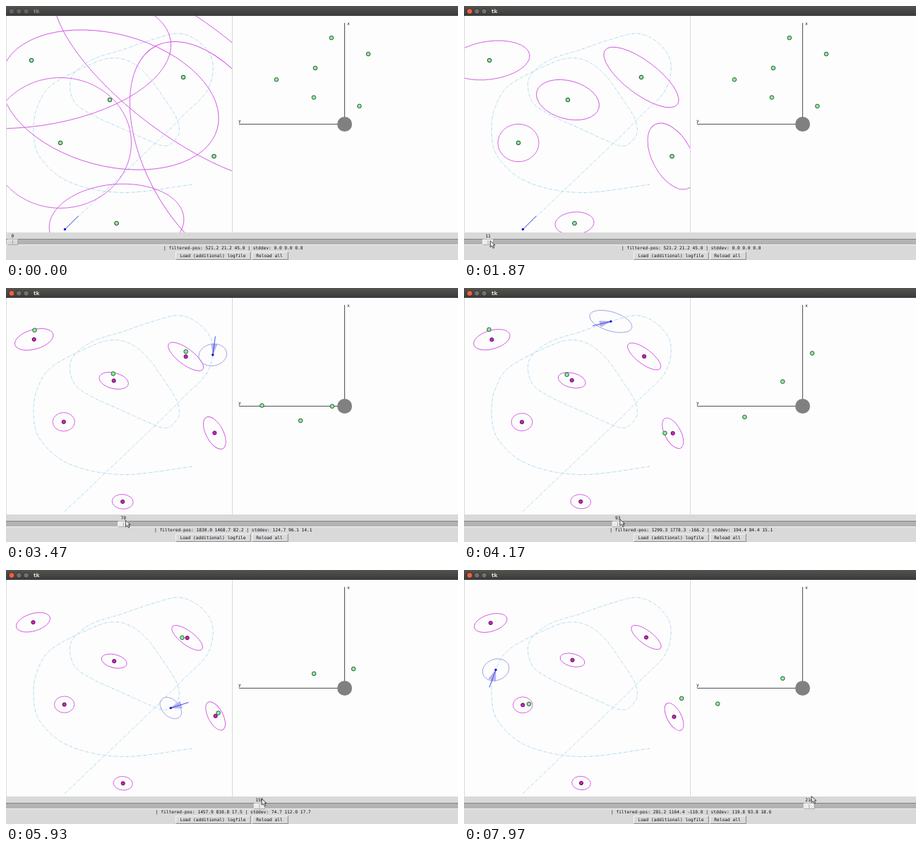
These frames come from a looping animation (640x360 px, 8 s). An HTML page:

```html
<!DOCTYPE html>
<html lang="en">
<head>
<meta charset="utf-8">
<title>tk</title>
<style>
html, body { margin: 0; width: 100%; height: 100%; overflow: hidden; background: #d9d9d9; }
svg { display: block; width: 100%; height: 100%; }
text { font: 6.2px "DejaVu Sans Mono", monospace; fill: #0c0c18; white-space: pre; }
.mid { text-anchor: middle; }
.title { font: bold 7.5px "DejaVu Sans", sans-serif; }
.ell { fill: none; stroke: #d255e4; stroke-width: .9; }
.mark { fill: #d820c8; stroke: #400a40; stroke-width: .9; }
.obs { fill: #90ee9c; stroke: #1c4a2c; stroke-width: .9; }
</style>
</head>
<body>
<svg viewBox="0 0 640 360">
  <defs>
    <linearGradient id="bar" x2="0" y2="1">
      <stop offset="0" stop-color="#55534f"/><stop offset="1" stop-color="#3a393b"/>
    </linearGradient>
    <clipPath id="map"><rect x="1" y="14" width="319" height="307"/></clipPath>
    <clipPath id="local"><rect x="321" y="14" width="319" height="307"/></clipPath>
  </defs>
  <rect width="640" height="360" fill="#d9d9d9"/>
  <rect width="640" height="14" fill="url(#bar)"/>
  <g id="buttons" stroke="#2a292c" stroke-width=".8">
    <circle id="close" cx="8" cy="7.5" r="4"/>
    <circle cx="18.3" cy="7.5" r="3.8" fill="#73716e"/>
    <circle cx="28.6" cy="7.5" r="3.8" fill="#73716e"/>
  </g>
  <text id="name" class="title" x="39" y="10.3">tk</text>
  <rect x="1" y="14" width="319" height="307" fill="#fdfdfd"/>
  <rect x="321" y="14" width="319" height="307" fill="#fdfdfd"/>
  <g id="left" clip-path="url(#map)"></g>
  <g clip-path="url(#local)">
    <path d="M479.5 24V167.5M330 167.5H479.5" stroke="#505058" fill="none"/>
    <text x="483" y="27">x</text><text x="329" y="165">y</text>
    <circle cx="479.5" cy="167.5" r="10.5" fill="#808080"/>
    <g id="right"></g>
  </g>
  <rect y="330.5" width="640" height="8" fill="#b3b3b3"/>
  <path d="M0 330.5H640" stroke="#828282"/>
  <path d="M0 338.5H640" stroke="#f2f2f2"/>
  <g id="thumb">
    <rect id="knob" x="-7.5" y="331" width="15" height="7.5"/>
    <path d="M-7.5 338V331H7.5" fill="none" stroke="#fff" stroke-width=".8"/>
    <path d="M-7.5 338.3H7.5V331M0 332V337.5" fill="none" stroke="#8c8c8c" stroke-width=".7"/>
  </g>
  <text id="label" class="mid" y="328.3"></text>
  <text id="status" class="mid" x="321.7" y="345.2"></text>
  <g fill="none" stroke-width=".9">
    <path d="M240.5 359V348.7H346M348.5 359V348.7H399" stroke="#fafafa"/>
    <path d="M240.5 359.4H346.3V348.7M348.5 359.4H399.3V348.7" stroke="#828282"/>
  </g>
  <text class="mid" x="293" y="355.8">Load (additional) logfile</text>
  <text class="mid" x="373" y="355.8">Reload all</text>
  <path id="cursor" d="M0 0V9L2.2 7L4 10.5L5.6 9.7L4 6.3H6.8Z" fill="#ececec" stroke="#1c1c20" stroke-width=".8"/>
</svg>
<script>
const $ = id => document.getElementById(id);
const SVG = 'http://www.w3.org/2000/svg';
const LOOP = 8000, SUB = 16, RAD = Math.PI / 180;

const set = (el, attrs) => { for (const k in attrs) el.setAttribute(k, attrs[k]); return el; };
const add = (parent, tag, attrs) => parent.appendChild(set(document.createElementNS(SVG, tag), attrs));
const lerp = (a, b, u) => a + (b - a) * u;
const mix = (a, b, u) => a.map((x, i) => lerp(x, b[i], u));

// Piecewise linear rows of [key, ...values]
function track(rows, k) {
  const i = Math.max(1, rows.findIndex(r => r[0] > k)), n = rows.length - 1;
  if (k >= rows[n][0]) return rows[n].slice(1);
  const a = rows[i - 1], b = rows[i];
  return mix(a, b, Math.max(0, (k - a[0]) / (b[0] - a[0]))).slice(1);
}

// World millimetres to map pixels
const SX = .16, SY = .1532, Y0 = 319.8;
const toMap = (x, y) => [x * SX, Y0 - y * SY];

const route = [
  [521.2, 21.2], [1353.7, 850.4], [1562, 1069], [1780, 1305], [1830, 1560], [1725, 1741], [1537, 1833],
  [1299.3, 1778.3], [1031, 1683], [750, 1585], [577, 1420], [600, 1210], [760, 1082], [1031, 952],
  [1281, 834], [1387, 795], [1457.9, 810.8], [1531, 912], [1506, 1056], [1387, 1252], [1250, 1448],
  [1112, 1565], [960.3, 1606.2], [775, 1559], [412, 1363], [281.2, 1164.4], [244, 939], [300, 690],
  [560, 460], [1031, 361], [1644, 436]
];

// Catmull-Rom samples: arc length, x, y, unwrapped heading
function sampleRoute() {
  const end = route.length - 1, at = i => route[Math.max(0, Math.min(end, i))];
  const pts = [];
  for (let k = 0; k <= end * SUB; k++) {
    const i = Math.floor(k / SUB), u = k / SUB - i;
    const [p, q, r, w] = [at(i - 1), at(i), at(i + 1), at(i + 2)];
    pts.push([0, 1].map(c => q[c] + .5 * u * (r[c] - p[c] +
      u * (2 * p[c] - 5 * q[c] + 4 * r[c] - w[c] + u * (3 * (q[c] - r[c]) + w[c] - p[c])))));
  }
  let len = 0, dir = 45;
  return pts.map((p, i) => {
    const a = pts[Math.max(0, i - 1)], b = pts[Math.min(pts.length - 1, i + 1)];
    const raw = Math.atan2(b[1] - a[1], b[0] - a[0]) / RAD;
    dir += ((raw - dir) % 360 + 540) % 360 - 180;
    len += Math.hypot(p[0] - a[0], p[1] - a[1]);
    return [len, ...p, dir];
  });
}
const samples = sampleRoute();

// step, route point, heading, three deviations, ellipse angle, pose error (x, y, turn)
const poses = [
  [11, 0, 45, 0, 0, 0, -40, 0, 0, 0],
  [46, 1, 45.4, 51.9, 108.4, 13.1, -40, 3, -7, 0],
  [93, 7, 193.8, 194.4, 84.4, 15.1, 17, -2.5, -5, -.055],
  [156, 16, 377.5, 74.7, 112, 17.7, -45, 2.8, 2, .1],
  [191, 22, 539.5, 152.3, 74.4, 15.7, 5, -.5, -4.6, .07],
  [214, 25, 610, 119.8, 93.8, 18.6, -20, 3, 3, .115]
].map(([v, i, th, ...rest]) => {
  const [len, , , dir] = samples[i * SUB];
  return [v, len, th - dir, ...rest];
});

// Ellipses [half axes, angle] at steps 11 and 214; centres at 11, 46 and 214
const marks = [
  { from: [57.5, 27, -8], to: [24, 12, -17], path: [[11, 36, 77], [46, 40, 72.5], [214, 37.7, 75]] },
  { from: [64, 23.5, 37], to: [25.5, 9.5, 37], path: [[11, 251, 101], [46, 254, 97.5], [214, 258, 95.5]] },
  { from: [45.5, 27, 15], to: [17.8, 9, 14], path: [[11, 147, 133], [46, 152.5, 132], [214, 153.5, 127.7]] },
  { from: [29, 26.7, 0], to: [13.8, 11.4, 0], path: [[11, 77, 194], [46, 81.5, 189.5], [214, 83.2, 191.3]], reach: 1150 },
  { from: [51, 28, 62], to: [21.5, 10, 62], path: [[11, 294.5, 213], [46, 295, 205], [214, 297.5, 208]] },
  { from: [27.6, 16, -5], to: [13.3, 9.6, 6], path: [[11, 156.5, 308], [46, 165, 303], [214, 166, 302]], reach: 1150 }
];

const drag = [[1100, 0], [1870, 11], [2500, 25], [2770, 46], [4170, 93], [5930, 156], [7270, 191], [7970, 214]];
const enter = [[300, 70, 365], [830, 13, 333.5]];

const left = $('left');
add(left, 'polyline', {
  points: samples.map(s => toMap(s[1], s[2]).map(n => n.toFixed(1))).join(' '),
  fill: 'none', stroke: '#9fd3ec', 'stroke-width': .9, 'stroke-dasharray': '4 1.6 1 1.6'
});
for (const m of marks) m.ell = add(left, 'ellipse', { class: 'ell' });
const cloud = add(left, 'ellipse', { fill: 'none', stroke: '#9494dc', 'stroke-width': .8 });
const wedge = add(left, 'path', { fill: '#b8b8f0', stroke: '#8c8ce0', 'stroke-width': .5 });
const nose = add(left, 'line', { stroke: '#3038d8', 'stroke-width': .9 });
const body = add(left, 'circle', { r: 1.7, fill: '#1010d0' });
for (const m of marks) {
  m.dot = add(left, 'circle', { class: 'mark', r: 2.6 });
  m.seen = add(left, 'circle', { class: 'obs', r: 2.8 });
  m.local = add($('right'), 'circle', { class: 'obs', r: 2.8 });
}

// While parked the axes shrink with the root of the observation count, then settle
function axes({ from, to }, v) {
  const inv = 12 / (v + 1), rest = 12 / 215;
  if (v >= 11) return mix(to, from, (inv - rest) / (1 - rest));
  const k = Math.sqrt(inv);
  return [from[0] * k, from[1] * k, from[2]];
}

function drawMark(m, v, x, y, th, [ex, ey, turn]) {
  const [cx, cy] = track(m.path, v), [rx, ry, rot] = axes(m, v);
  set(m.ell, { cx, cy, rx, ry, transform: `rotate(${rot} ${cx} ${cy})` });
  set(m.dot, { cx, cy });

  const [px, py] = toMap(x, y);
  const ox = cx + ex + turn * (cy - py), oy = cy + ey - turn * (cx - px);
  const dx = (ox - px) / SX, dy = (py - oy) / SY;
  const c = Math.cos(th * RAD), s = Math.sin(th * RAD);
  const ahead = c * dx + s * dy, side = c * dy - s * dx;
  const inView = Math.abs(Math.atan2(side, ahead)) < 110 * RAD && Math.hypot(dx, dy) < (m.reach || 2000);
  const visibility = inView ? 'visible' : 'hidden';
  set(m.seen, { cx: ox, cy: oy, visibility });
  set(m.local, { cx: 479.5 - side * .0735, cy: 167.5 - ahead * .0705, visibility });
}

function drawRobot(x, y, th, [s1, s2, s3], rot) {
  const [px, py] = toMap(x, y);
  const ray = (r, a) => [px + r * Math.cos(a * RAD), py - r * Math.sin(a * RAD)];
  const tip = ray(26.5, th);
  set(cloud, { cx: px, cy: py, rx: s1 * SX, ry: s2 * SX, transform: `rotate(${rot} ${px} ${py})` });
  set(wedge, {
    d: `M${px} ${py}L${ray(16, th - s3)}L${ray(16, th + s3)}Z`,
    visibility: s3 ? 'visible' : 'hidden'
  });
  set(nose, { x1: px, y1: py, x2: tip[0], y2: tip[1] });
  set(body, { cx: px, cy: py });
}

function render(t) {
  const focus = t >= 1000;
  const v = Math.round(track(drag, t)[0]);
  const [len, bend, s1, s2, s3, rot, ...error] = track(poses, v);
  const [x, y, dir] = track(samples, len);
  const th = dir + bend, dev = [s1, s2, s3];

  drawRobot(x, y, th, dev, rot);
  for (const m of marks) drawMark(m, v, x, y, th, error);

  const shown = ((th + 181) % 360 + 360) % 360 - 181;
  const fmt = list => list.map(n => n.toFixed(1)).join(' ');
  $('status').textContent = `| filtered-pos: ${fmt([x, y, shown])} | stddev: ${fmt(dev)}`;

  const pos = 9.4 + v * 2.24;
  set($('thumb'), { transform: `translate(${pos} 0)` });
  set($('knob'), { fill: t > 830 ? '#ececec' : '#d9d9d9' });
  set($('label'), { x: pos }).textContent = v;

  const [cx, cy] = t < 1100 ? track(enter, t) : [pos + 3.2, 333.5 - v * .06];
  set($('cursor'), { transform: `translate(${cx} ${cy})` });
  set($('close'), { fill: focus ? '#f0623c' : '#73716e' });
  set($('buttons'), { opacity: focus ? 1 : .7 });
  set($('name'), { style: `fill:${focus ? '#dfdbd2' : '#8c8a86'}` });
}

function loop() {
  render(performance.now() % LOOP);
  requestAnimationFrame(loop);
}
loop();
</script>
</body>
</html>
```
